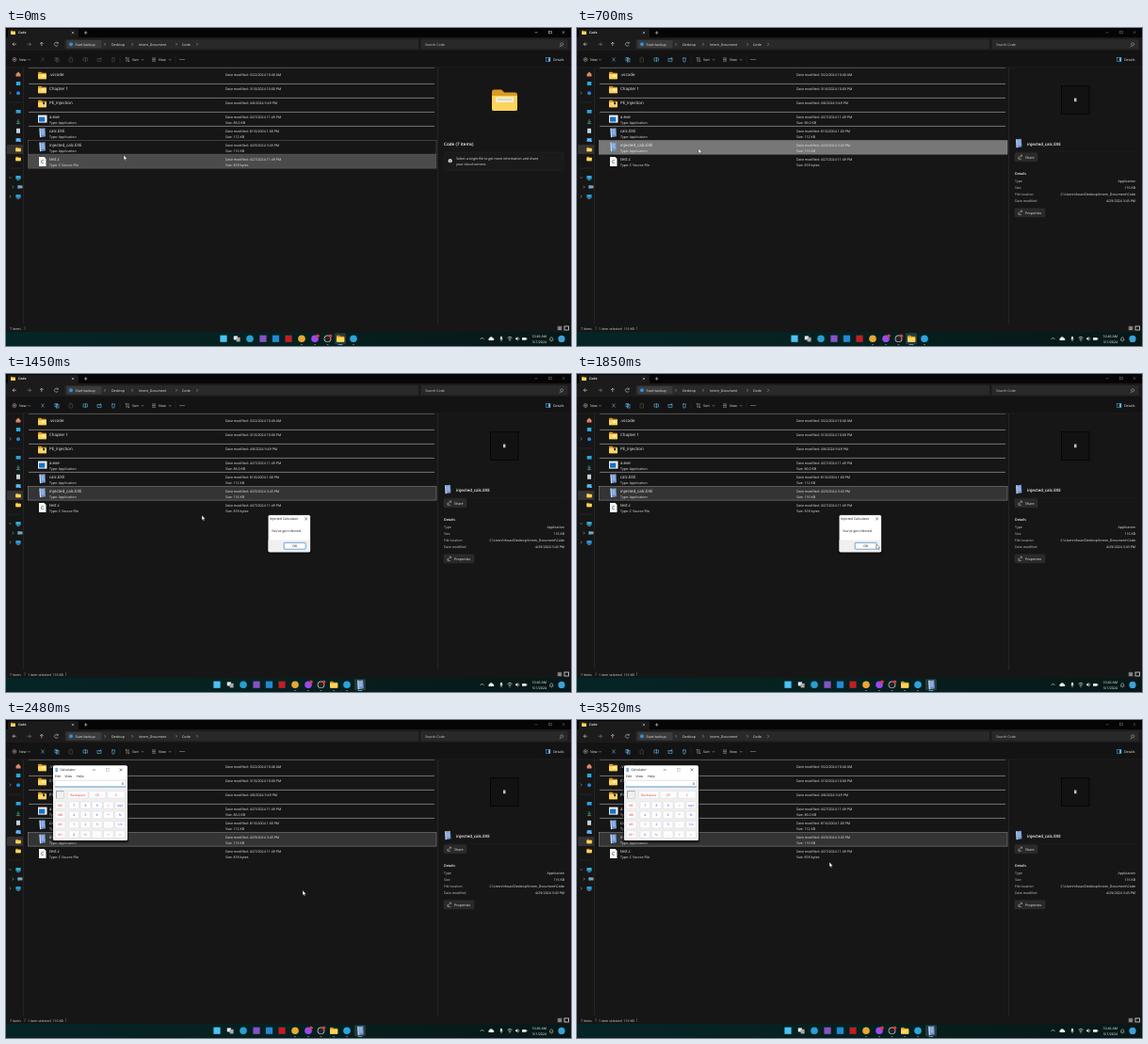
Animation, 600 px wide and 338 px high, one loop 3550 ms. Source, as an HTML page:

```html
<!DOCTYPE html>
<html lang="en">
<head>
<meta charset="utf-8">
<title>File manager session</title>
<style>
html, body { margin: 0; width: 100%; height: 100%; overflow: hidden; background: #161616; }
svg { display: block; width: 100vw; height: 100vh; font-family: "Open Sans", "Noto Sans", sans-serif; text-rendering: geometricPrecision; }
.timed { animation: 3550ms step-end infinite; }
#cursor { animation: travel 3550ms ease-in-out infinite; }
@keyframes travel {
  0% { transform: translate(125px, 135px); }
  1.5% { transform: translate(125px, 135px); }
  8% { transform: translate(129px, 128px); }
  35% { transform: translate(129px, 128px); }
  48% { transform: translate(318px, 181px); }
  56% { transform: translate(318px, 181px); }
  62% { transform: translate(315px, 181px); }
  70% { transform: translate(315px, 181px); }
  79% { transform: translate(295px, 167px); }
  85% { transform: translate(295px, 167px); }
  96%, 100% { transform: translate(268px, 151px); }
}
#bar { animation: shift 3550ms ease-out infinite; }
@keyframes shift {
  0%, 27.5% { transform: none; }
  31%, 100% { transform: translateX(-7px); }
}
</style>
</head>
<body>
<svg id="stage" viewBox="0 0 600 338" preserveAspectRatio="none"></svg>
<script>
const LOOP = 3550;
const SELECT = 420, BLUR = 600, LAUNCH = 1000, DIALOG = 1050, LEAVE = 1290, PRESS = 2230, CLOSE = 2420;
const css = [];
let count = 0;

const rect = (x, y, w, h, fill, more = "") => `<rect x="${x}" y="${y}" width="${w}" height="${h}" fill="${fill}" ${more}/>`;
const dot = (x, y, r, fill) => `<circle cx="${x}" cy="${y}" r="${r}" fill="${fill}"/>`;
const line = (d, stroke = "#ddd", w = .6) => `<path d="${d}" fill="none" stroke="${stroke}" stroke-width="${w}"/>`;
const text = (x, y, s, size = 3.6, fill = "#eee", more = "") =>
  `<text x="${x}" y="${y}" font-size="${size}" fill="${fill}" ${more}>${s}</text>`;
const BOLD = 'font-weight="600"', END = 'text-anchor="end"', MID = 'text-anchor="middle"';
const edge = (c, w = .5) => `stroke="${c}" stroke-width="${w}"`;
const right = (x, y) => line(`M${x - .7} ${y - 1.4}l1.4 1.4l-1.4 1.4`, "#bbb", .5);
const down = (x, y) => line(`M${x - 1.2} ${y - .6}l1.2 1.2l1.2-1.2`, "#bbb", .5);
const cross = (x, y, c, r = 1.4) => line(`M${x - r} ${y - r}l${2 * r} ${2 * r}m0 ${-2 * r}l${-2 * r} ${2 * r}`, c, .5);

// Shows markup only between two moments of the loop.
function during(from, to, body) {
  const id = "v" + count++, at = t => (t / LOOP * 100).toFixed(3) + "%";
  const first = from ? `0% {visibility:hidden} ${at(from)} {visibility:visible}` : "0% {visibility:visible}";
  const last = to < LOOP ? `${at(to)} {visibility:hidden}` : "";
  css.push(`@keyframes ${id} {${first} ${last}}`);
  return `<g class="timed" style="animation-name:${id}">${body}</g>`;
}

function folder(x, y, k = 1) {
  return `<g transform="translate(${x} ${y}) scale(${k})">
    <path d="M0 .8Q0 0 .8 0H3.4L4.4 1H8.3Q9 1 9 1.8V7.4H0Z" fill="#d99a20"/>
    <path d="M0 2.2H9V6.7Q9 7.5 8.2 7.5H.8Q0 7.5 0 6.7Z" fill="#ffd45c"/></g>`;
}

const notebook = (x, y, k = 1) => `<g transform="translate(${x} ${y}) scale(${k})">
  <path d="M1 .5L7 0L7.5 9L1.5 10Z" fill="#6f96d0"/><path d="M1 .5L2 .4L2.5 9.8L1.5 10Z" fill="#dbe7f7"/>
  ${line("M3 2.5L6 2.2M3.1 4.4L6.2 4.1M3.2 6.3L6.3 6", "#c9dcf5", .7)}</g>`;

const gear = (x, y, c) => line(`M${x - 1.5} ${y - 2}l3 4m0-4l-3 4`, c, .6);

function tools(ink) {
  const box = (x, y, w, h) => rect(x, y, w, h, "none", edge(ink, .6));
  return gear(39, 33.5, ink) + box(52, 31.5, 2.6, 3.4) + box(53.4, 32.6, 2.6, 3.4)
    + box(82, 32, 4.4, 3) + line("M84.5 31v5", ink)
    + box(97, 32.5, 4, 3) + line("M99 34l2-3", ink)
    + line("M112 32h4m-3.4 0l.4 4h2l.4-4m-2-1v1", ink);
}

function chrome() {
  let s = rect(0, 0, 600, 338, "#161616") + rect(0, 0, 600, 10, "#050505")
    + rect(2, 1, 75, 10, "#1b1b1b", 'rx="1.5"') + rect(0, 10, 600, 14, "#1b1b1b")
    + folder(5, 2.8, .55) + text(13, 6.4, "Code", 3.5, "#fff", BOLD)
    + cross(71, 5, "#ddd", 1.2) + line("M83 5h3.4m-1.7-1.7v3.4");
  s += line("M11 17.2H7m1.8-1.8L7 17.2L8.8 19M37.8 19.2v-4m-1.8 1.8l1.8-1.8l1.8 1.8", "#ddd")
    + line("M22.5 17.2h4m-1.8-1.8l1.8 1.8L24.7 19", "#888")
    + line("M55 16a2 2 0 1 0 .3 2M55.3 14.8v1.5h-1.6", "#ddd", .5);
  s += rect(62.5, 12, 375.5, 10.5, "#292929", 'rx="1"') + rect(64.5, 13, 37, 8.6, "#3b3b3b", 'rx="1"')
    + dot(69, 17.3, 2, "#2f8fe0") + text(73.5, 18.6, "Start backup")
    + [[112, "Desktop"], [141, "Intern_Document"], [187, "Code"]].map(([x, n]) => text(x, 18.6, n)).join("")
    + [105, 134, 181, 203].map(x => right(x, 17.3)).join("")
    + rect(440.5, 12, 156, 10.5, "#292929", 'rx="1"') + text(445, 18.6, "Search Code", 3.6, "#ccc")
    + line("M589 19l-1.2 1.2M590.2 15.8a1.5 1.5 0 1 1-.1 0Z", "#ccc", .5);
  s += rect(0, 24, 600, 18, "#131313") + line("M0 42H600", "#2b2b2b", .6)
    + line("M11 33.5a2 2 0 1 1-4 0a2 2 0 1 1 4 0M9 32.4v2.2m-1.1-1.1h2.2", "#bbb", .5)
    + text(14, 34.8, "New") + down(24.5, 33.7)
    + line("M67 32h3.5v4H67ZM68 31h1.6", "#555", .5)
    + line("M128 36v-5l-1.2 1.2M130 31v5l1.2-1.2", "#ccc", .5) + text(134, 34.8, "Sort") + down(145, 33.7)
    + line("M155 32h4m-4 1.6h4m-4 1.6h4", "#ccc", .5) + text(162, 34.8, "View") + down(174.2, 33.7)
    + line("M121 29.5v8M180 29.5v8", "#333", .4)
    + [185, 187, 189].map(x => dot(x, 33.6, .5, "#ddd")).join("")
    + rect(573.5, 31.5, 4.4, 4, "none", edge("#56b7ee")) + rect(576, 31.5, 2, 4, "#56b7ee") + text(581, 34.8, "Details");
  s += during(0, SELECT, tools("#4c4c4c")) + during(SELECT, LOOP, tools("#5ab3df"));
  const controls = c => line("M561.5 4.8h3", c, .5) + rect(576.7, 3.2, 2.6, 2.6, "none", edge(c)) + cross(592, 4.6, c, 1.3);
  return s + during(0, BLUR, controls("#ddd")) + during(BLUR, LOOP, controls("#777"));
}

function sidebar() {
  let s = line("M18.5 42V314", "#303030", .6) + rect(1, 124, 17, 10, "#333", 'rx="1"')
    + line("M3 79h13M3 149h13", "#333", .5);
  s += `<path d="M10.5 49L13 46.5L15.5 49V51.5H10.5Z" fill="#d98a62"/>`
    + rect(10.8, 57, 4.5, 4, "#29a9e0") + dot(13, 69.3, 2, "#2587d8")
    + rect(10.6, 87, 5, 3.6, "#2da3dd") + line("M13 97v3.6m-1.6-1.6l1.6 1.6l1.6-1.6M11 101.6h4", "#45b894", .7)
    + rect(11, 106.8, 4, 5, "#c6d3da") + rect(10.6, 117, 5, 4, "#3f9fe0") + line("M10.6 120l2-2l3 3", "#d8effb", .6)
    + folder(10.3, 126.8, .6) + folder(10.3, 136.8, .6)
    + rect(10.4, 157, 5.2, 3.6, "#2cacdc") + line("M11.5 161.6h3", "#9cc", .6)
    + rect(12.5, 167.4, 5, 3, "#8da3ad") + rect(12.5, 167.4, 2, 3, "#45a9dc")
    + rect(10.4, 177, 5.2, 3.6, "#2a9bd5") + line("M11.5 181.4h3", "#9cc", .6);
  return s + right(4.5, 69) + down(4.5, 159) + right(7.5, 169) + right(4.5, 179);
}

function rowTint(i, fill, border) {
  return rect(23.5, 119.7 + 15 * (i - 5), 433.5, 14.4, fill, border ? edge(border) : "");
}

function files() {
  const rows = [
    [".vscode", "3/22/2024 10:40 AM"], ["Chapter 1", "3/10/2024 10:00 PM"], ["PE_Injection", "4/8/2024 9:49 PM"],
    ["a.exe", "4/27/2024 11:49 PM", "Application", "86.0 KB"], ["calc.EXE", "8/10/2004 1:00 PM", "Application", "112 KB"],
    ["injected_calc.EXE", "4/29/2024 3:43 PM", "Application", "116 KB"], ["test.c", "4/27/2024 11:49 PM", "C Source File", "818 bytes"]];
  let s = line("M24 42.4H455", "#8b8b8b", .5);
  for (let i = 1; i < 5; i++) s += line(`M24 ${44.4 + 15 * i}H455`, "#b5b5b5", .6);
  s += during(0, 150, rowTint(5, "none", "#666") + rowTint(6, "#4b4b4b", "#666"))
    + during(150, SELECT, rowTint(5, "#4b4b4b", "#777"))
    + during(SELECT, LEAVE, rowTint(5, "#777", "#999"))
    + during(LEAVE, LOOP, rowTint(5, "#343434", "#999"));
  rows.forEach(([name, date, type, size], i) => {
    const y = 51 + 15 * i;
    s += text(46, y, name, 4.4, "#f4f4f4") + text(233, y + .1, "Date modified: " + date);
    if (type) s += text(46, y + 5.5, "Type: " + type) + text(233, y + 5.5, "Size: " + size);
    if (i < 3) s += folder(34, y - 4.2) + rect(38, y - 1.5, 3.2, 2.3, i ? "#f8efd0" : "#fff3bd");
  });
  s += rect(39, 78.6, 2.2, 2.7, "#333")
    + rect(34, 92.6, 9.5, 8, "#f3f3f3") + rect(35, 94.6, 6.3, 5, "#1671c9")
    + notebook(34.5, 106.2) + notebook(34.5, 121.2)
    + `<path d="M35 137h5.5l2 2v8H35Z" fill="#f7f7f7"/>` + text(38.7, 144.2, "C", 5.4, "#2a6a70", BOLD + " " + MID);
  return s;
}

function panel() {
  const button = (y, w, label) => rect(465, y, w, 9, "#2a2a2a", 'rx="1" ' + edge("#383838", .4))
    + line(`M469 ${y + 5.8}l3.4-3.4m-1.7 0h1.7v1.7M469 ${y + 4}v2.6h3`, "#ccc", .5) + text(476, y + 5.8, label);
  const facts = [["Type", "Application"], ["Size", "116 KB"],
    ["File location", "C:\\Users\\thoav\\Desktop\\Intern_Document\\Code"], ["Date modified", "4/29/2024 3:43 PM"]];
  const empty = folder(516, 65.5, 3) + rect(520, 73.5, 19, 5.5, "#f4efdc") + line("M522 76h15", "#b8b0a0", .8)
    + text(465, 124.6, "Code (7 items)", 4.6, "#fff", BOLD)
    + rect(465, 132.5, 128, 19, "#1a1a1a", 'rx="1" ' + edge("#252525", .4))
    + dot(471.7, 141.2, 2.1, "#ddd") + line("M471.7 139.8v.6m0 .5v1.8", "#222", .6)
    + text(478, 140.4, "Select a single file to get more information and share", 3.55)
    + text(478, 146, "your cloud content.", 3.55);
  const chosen = rect(514.5, 61.5, 29.5, 30, "#121212", edge("#050505", .9))
    + rect(528, 74.6, 2.4, 3.6, "#ddd") + line("M528.4 75.8h1.5m-1.5 1.3h1.5", "#456", .4)
    + notebook(465.3, 117.8, .95) + text(478, 124.8, "injected_calc.EXE", 4.4, "#fff", BOLD)
    + button(132.7, 24, "Share") + text(465, 155.6, "Details", 3.6, "#fff", BOLD)
    + facts.map(([k, v], i) => text(465, 164.3 + 7 * i, k, 3.55, "#ccc") + text(593, 164.3 + 7 * i, v, 3.55, "#eee", END)).join("")
    + button(191.8, 32, "Properties");
  return rect(458, 42.3, 142, 273, "#161616") + line("M458.5 42V315", "#303030", .6)
    + line("M465 131.2H593", "#272727", .4) + during(0, SELECT, empty) + during(SELECT, LOOP, chosen);
}

function status() {
  return text(4, 320.6, "7 items", 3.5, "#ddd") + line("M20 317v4", "#888", .4)
    + during(SELECT, LOOP, text(23, 320.6, "1 item selected", 3.5, "#ddd") + text(49.5, 320.6, "116 KB", 3.5, "#ddd") + line("M63.5 317v4", "#888", .4))
    + rect(585.5, 316.8, 5, 4.6, "#555") + line("M586.4 318h3.2m-3.2 1.2h3.2m-3.2 1.2h3.2", "#ddd", .5)
    + rect(593, 317, 4.4, 4, "none", edge("#ddd", .8));
}

function taskbar() {
  const plate = x => rect(x - 6, 324.3, 12, 12, "#ffffff", 'opacity=".13" rx="1.3"');
  const square = (x, c) => rect(x - 3.6, 326.6, 7.2, 7.2, c);
  const round = (x, c) => dot(x, 330.3, 3.8, c);
  const mark = (x, c = "#8a9696", w = 2) => rect(x - w / 2, 336, w, .8, c, 'rx=".4"');
  let icons = during(0, LAUNCH, plate(355) + mark(355, "#62c8f5", 5)) + during(LAUNCH, LOOP, mark(355))
    + square(231, "#4cc2f5") + rect(241.8, 327.4, 4.2, 4, "#eee") + rect(244.6, 328.8, 4, 4.6, "#aaa")
    + round(259, "#2a9fd0") + square(273, "#8653c4") + square(286.5, "#2489d3") + square(300, "#bf1f25")
    + round(314, "#e7a932") + round(328, "#994bec") + round(341.5, "#dadada") + dot(341.5, 330.3, 3.1, "#222")
    + dot(331, 327.2, 1.8, "#e83240") + dot(344.5, 327.2, 1.8, "#e83240") + folder(351, 326.8, .92) + round(369, "#2ba4de")
    + [314, 328, 341.5, 369].map(x => mark(x)).join("");
  icons += during(LAUNCH, LOOP, during(1400, LOOP, plate(383) + mark(383, "#62c8f5", 5)) + notebook(379.3, 325.2));
  const tray = line("M503.5 331l2-2l2 2", "#eee", .6) + `<path d="M513 332a1.3 1.3 0 0 1 .3-2.4a2 2 0 0 1 3.7 0a1.3 1.3 0 0 1 .7 2.4Z" fill="#eee"/>`
    + rect(525, 327.7, 2, 3.3, "#eee", 'rx="1"') + line("M524.3 330.5q1.7 3 3.4 0M526 332v1.2", "#eee", .5)
    + line("M532.6 329.3q2.4-2 4.8 0M533.6 330.8q1.4-1.1 2.8 0", "#eee", .7) + dot(535, 332.1, .6, "#eee")
    + `<path d="M541 329.5h1l1.4-1.4v4.4l-1.4-1.4h-1Z" fill="#eee"/>` + line("M544.4 329q1 1.3 0 2.6", "#eee", .5)
    + rect(548, 329, 4.6, 2.8, "#eee", 'rx=".6"') + rect(552.8, 329.8, .6, 1.2, "#eee")
    + text(574, 329.2, "10:46 AM", 3.6, "#fff", END) + text(574, 334.7, "5/1/2024", 3.6, "#fff", END)
    + line("M577.2 332q.7-.7.7-2a1.3 1.3 0 0 1 2.6 0q0 1.3.7 2ZM578.6 333h1.2", "#ddd", .5) + dot(590, 330.4, 3.6, "#3da1d8");
  return rect(0, 323, 600, 15, "url(#teal)") + `<g id="bar">${icons}</g>` + tray;
}

function dialog() {
  const ok = (fill, line) => rect(295.2, 179.3, 23, 6.9, fill, 'rx=".8" ' + edge(line, .7));
  return rect(277.4, 150.4, 46.8, 41, "#000", 'opacity=".45" rx="2"')
    + rect(278.5, 150, 44.6, 39.2, "#fff", `rx="1.5" ${edge("#777", .3)}`)
    + `<path d="M278.6 176.4h44.4v11.3q0 1.5-1.5 1.5h-41.4q-1.5 0-1.5-1.5Z" fill="#f0f0f0"/>`
    + text(280, 155.4, "Injected Calculator", 3.5, "#111") + cross(318.6, 153.9, "#222", 1.4)
    + text(282, 168.3, "You've got infected", 3.5, "#111")
    + during(0, PRESS, ok("#fdfdfd", "#3a7fc4")) + during(PRESS, LOOP, ok("#b9daf5", "#2476c0"))
    + text(306.7, 184.1, "OK", 3.5, "#111", MID);
}

function calculator() {
  const red = "#e23a3a", blue = "#3344dd";
  const key = (x, y, w, label, c) => rect(x, y, w, 7.6, "#fdfdfd", 'rx=".7" ' + edge("#cfcfcf", .4)) + text(x + w / 2, y + 5, label, 3.3, c, MID);
  let s = rect(48.6, 48.6, 81.6, 82, "#000", 'opacity=".5" rx="2"') + rect(50, 48.5, 79, 79.6, "#f0f0f0", 'rx="1.5"')
    + `<path d="M50 63.6V50q0-1.5 1.5-1.5h76q1.5 0 1.5 1.5v13.6Z" fill="#fff"/>`
    + notebook(51.6, 50.7, .45) + text(57.4, 54.3, "Calculator", 3.5, "#111")
    + line("M91.8 53h3", "#222", .5) + rect(106.6, 51.6, 2.6, 2.6, "none", edge("#aaa")) + cross(122, 52.9, "#222", 1.4)
    + [[52, "Edit"], [62.5, "View"], [75, "Help"]].map(([x, n]) => text(x, 61.3, n, 3.5, "#111")).join("")
    + rect(52, 64.2, 75, 6.8, "#fff", edge("#ccc", .4)) + line("M52 71h75", "#2779c4", .7) + text(125, 68.8, "0", 3.6, "#111", END)
    + rect(53.5, 75.6, 8, 7.6, "#f0f0f0", edge("#bbb", .4)) + line("M53.5 83.2v-7.6h8", "#888", .6)
    + key(65.5, 75.6, 21.5, "Backspace", red) + key(88, 75.6, 18, "CE", red) + key(107.5, 75.6, 18.8, "C", red);
  const keys = ["MC 7 8 9 / sqrt", "MR 4 5 6 * %", "MS 1 2 3 - 1/x", "M+ 0 +/- . + ="];
  keys.forEach((row, r) => row.split(" ").forEach((k, c) => {
    const x = c ? 54.7 + 12.2 * c : 52.3;
    s += key(x, 86.8 + 10.3 * r, 10.7, k, c === 0 || c === 4 || k === "=" ? red : blue);
  }));
  return s;
}

const pointer = `<path id="cursor" d="M0 0V5.2L1.2 4.2L2 6L2.9 5.6L2.1 3.9H3.7Z" fill="#fff" stroke="#111" stroke-width=".35"/>`;

document.getElementById("stage").innerHTML =
  `<defs><linearGradient id="teal"><stop stop-color="#052524"/><stop offset=".5" stop-color="#06201f"/><stop offset="1" stop-color="#071817"/></linearGradient></defs>`
  + chrome() + sidebar() + files() + panel() + status() + taskbar()
  + during(2310, CLOSE, rect(52.5, 53.5, 67.5, 6.2, "#444", 'opacity=".7"'))
  + during(CLOSE, LOOP, calculator())
  + (() => {
    // The button states carry their own timing, so the window is hidden by opacity.
    const at = t => (t / LOOP * 100).toFixed(3) + "%";
    css.push(`@keyframes popup {0% {opacity:0} ${at(DIALOG)} {opacity:1} ${at(CLOSE)} {opacity:0}}`);
    return `<g class="timed" style="animation-name:popup">${dialog()}</g>`;
  })()
  + pointer;

const sheet = document.createElement("style");
sheet.textContent = css.join("\n");
document.head.append(sheet);
</script>
</body>
</html>
```
